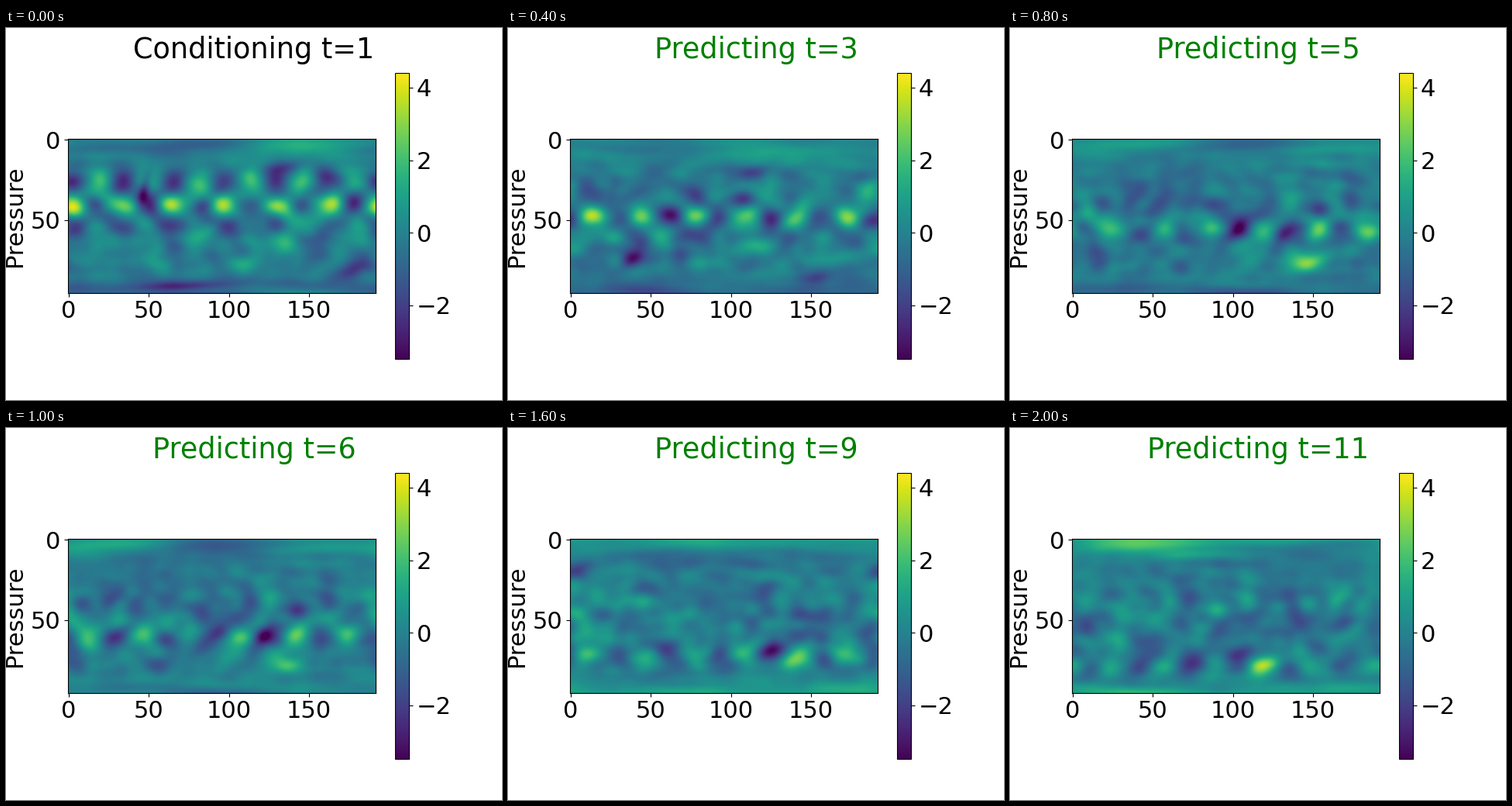
These frames come from a looping animation (640x480 px, 2200 ms). A matplotlib script:

```python
import numpy as np
import matplotlib.pyplot as plt
from matplotlib.animation import FuncAnimation

NX, NY = 192, 96
STEPS = 11
DRIFT = 10.5        # cells westward per step
SINK = 3.9          # rows the wave train descends per step
WAVENUMBER = 6
X, Y = np.meshgrid(np.arange(NX), np.arange(NY))

# Strong eddies: step of peak, x and y at that step, strength, width
EDDIES = [
    (1, 47, 31, -2.4, 3),
    (1, 72, 91, -2.0, 22),
    (2, 126, 18, -2.6, 9),
    (2, 166, 83, -2.6, 7),
    (3, 38, 75, -2.8, 6),
    (5, 103, 56, -1.9, 5),
    (5, 150, 76, 2.5, 7),
    (6, 121, 60, -2.4, 5),
    (8, 11, 18, -2.5, 7),
    (8, 111, 71, 2.2, 7),
    (10, 113, 70, -3.0, 6),
    (10.5, 123, 78, 2.9, 7),
    (10.5, 84, 8, 1.3, 16),
]


def band(y, height):
    return np.exp(-0.5 * ((Y - y) / height) ** 2)


def background(t):
    """Mean flow: the top warms steadily, the bottom flips midway."""
    mid = -0.03 * t
    top = 0.12 * t - 0.3
    bottom = 0.8 * np.tanh(t - 6)
    return (mid + (top - mid) * np.exp(-(Y / 8) ** 2)
            + (bottom - mid) * np.exp(-((NY - 1 - Y) / 8) ** 2))


def wave_train(t):
    """Checkerboard of cells that drifts west, sinks and fades."""
    y = 36.5 + SINK * t
    cells = 0.2 + np.cos(2 * np.pi * WAVENUMBER * (X - 12 + DRIFT * t) / NX)
    main = 2.5 * np.exp(-0.07 * (t - 1)) * band(y, 5)
    side = np.exp(-(t - 1) / 2.5) * (2.1 * band(y - 14, 6) + 1.4 * band(y + 13, 5))
    return (main - side) * cells


def eddy(t, peak, x, y, amp, width):
    age = t - peak
    dx = (X - x + DRIFT * age + NX / 2) % NX - NX / 2
    dy = Y - y - 1.5 * age + 12 / width ** 2 * dx
    height = 10 / np.sqrt(width)
    fade = np.exp(-0.5 * (age / 1.1) ** 2)
    return amp * fade * np.exp(-0.5 * ((dx / width) ** 2 + (dy / height) ** 2))


def smooth_noise(rng, sx, sy):
    fy = np.fft.fftfreq(NY)[:, None]
    fx = np.fft.rfftfreq(NX)[None, :]
    low = np.exp(-2 * np.pi ** 2 * ((sx * fx) ** 2 + (sy * fy) ** 2))
    n = np.fft.irfft2(np.fft.rfft2(rng.standard_normal((NY, NX))) * low, (NY, NX))
    return n / n.std()


rng = np.random.default_rng(4)
SMALL = [smooth_noise(rng, 4.5, 3.5) for _ in range(2)]
LONG = [smooth_noise(rng, 16, 2.5) for _ in range(2)]
INNER = np.exp(-((Y - 50) / 36) ** 4)


def turbulence(t):
    """Drifting fine eddies inside, long streaks near top and bottom."""
    def evolve(pair):
        n = np.cos(0.6 * t) * pair[0] + np.sin(0.6 * t) * pair[1]
        return np.roll(n, -round(DRIFT * t), axis=1)
    return 0.55 * INNER * evolve(SMALL) + 0.4 * (1 - INNER) * evolve(LONG)


def field(t):
    return (background(t) + wave_train(t) + turbulence(t)
            + sum(eddy(t, *e) for e in EDDIES))


plt.rcParams.update({"font.size": 22, "font.family": "DejaVu Sans"})
fig, ax = plt.subplots(figsize=(6.4, 4.8), dpi=100)
image = ax.imshow(field(1), cmap="viridis", vmin=-3.486, vmax=4.414)
ax.set_ylabel("Pressure")
fig.colorbar(image, ax=ax)
title = fig.suptitle("")


def draw(i):
    t = i + 1
    image.set_data(field(t))
    given = t <= 2
    title.set_text(f"{'Conditioning' if given else 'Predicting'} t={t}")
    title.set_color("black" if given else "green")
    return image, title


anim = FuncAnimation(fig, draw, frames=STEPS, interval=200, repeat=True,
                     repeat_delay=0, blit=False)
plt.show()
```
